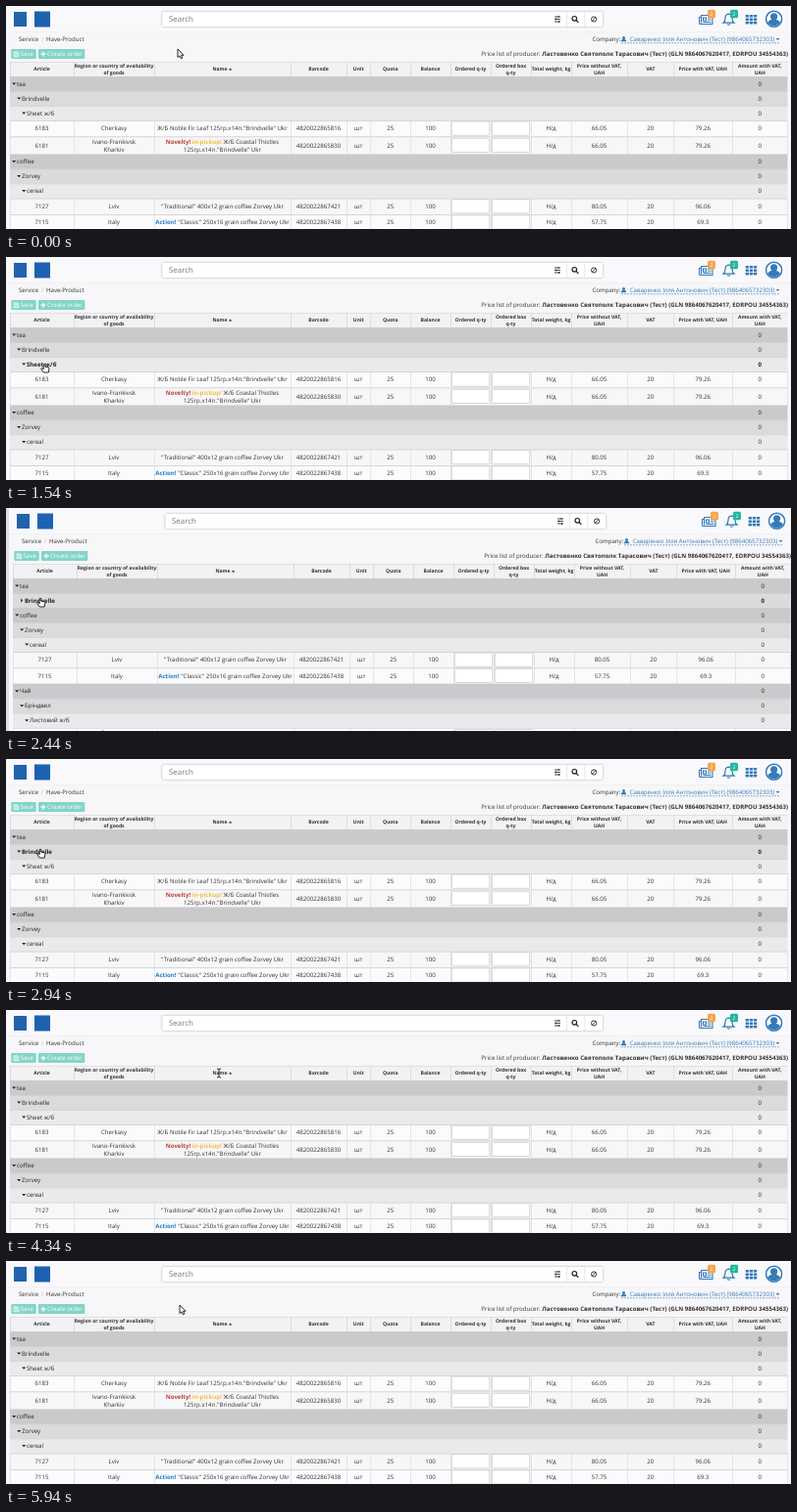
These frames come from a looping animation (800x228 px, 6240 ms). An HTML page:

```html
<!DOCTYPE html>
<html lang="en">
<head>
<meta charset="utf-8">
<title>Price list</title>
<style>
html, body { margin: 0; width: 100%; height: 100%; overflow: hidden; background: #f7f6f8; }
svg { display: block; width: 800px; height: 228px; font-family: "Open Sans", "Noto Sans", sans-serif; text-rendering: geometricPrecision; }
.raised { filter: drop-shadow(0 .3px 1.3px #aaa); }
</style>
</head>
<body>
<svg viewBox="0 0 800 228">
  <g id="page"><g id="chrome"></g><g id="rows"></g></g>
  <g id="cursor" stroke="#111" stroke-width=".9" stroke-linejoin="round" fill="#fff">
    <path id="arrow" d="M0 0V8.6L2 6.9 3.3 9.8 4.8 9.1 3.5 6.3H6Z"/>
    <path id="hand" d="M-.8 .6Q0-.4.8.6V3.2L4 3.7Q5 4 4.8 5.3L4.2 9H-.8L-3.4 5.3Q-3.2 4.2-2 4.8L-.8 5.8Z"/>
    <path id="beam" fill="none" d="M-2-4.5Q0-4.5 0-3.5Q0-4.5 2-4.5M0-3.5V3.5M-2 4.5Q0 4.5 0 3.5Q0 4.5 2 4.5"/>
  </g>
</svg>
<script>
const LOOP = 6240, TOP = 72.2, BODY = 6.1, BLUE = '#337ab7';
const $ = id => document.getElementById(id);

const rect = (x, y, w, h, fill, extra = '') =>
  `<rect x="${x}" y="${y}" width="${w}" height="${h}" fill="${fill}" ${extra}/>`;
const path = (d, fill, extra = '') => `<path d="${d}" fill="${fill}" ${extra}/>`;
// y is the vertical middle of the digits
const text = (x, y, str, { size = BODY, anchor = 'start', bold = false, fill = '#333' } = {}) =>
  `<text x="${x}" y="${y + size * .36}" font-size="${size}" text-anchor="${anchor}" ` +
  `font-weight="${bold ? 700 : 400}" fill="${fill}">${str}</text>`;
const lines = (x, y, list, gap, opts) =>
  list.map((s, i) => text(x, y + (i - (list.length - 1) / 2) * gap, s, { anchor: 'middle', ...opts })).join('');
const strong = (str, fill) => `<tspan font-weight="700" fill="${fill}">${str}</tspan>`;

const edges = [4, 69, 151, 290, 347, 371.5, 412, 453, 494, 535, 576, 633, 680.5, 740, 796.5];
const mid = i => (edges[i] + edges[i + 1]) / 2;
const headers = [
  ['Article'], ['Region or country of availability', 'of goods'], ['Name'], ['Barcode'], ['Unit'], ['Quota'],
  ['Balance'], ['Ordered q-ty'], ['Ordered box', 'q-ty'], ['Total weight, kg'], ['Price without VAT,', 'UAH'],
  ['VAT'], ['Price with VAT, UAH'], ['Amount with VAT,', 'UAH']
];

const group = (level, name) => ({ level, name, height: 15 });
const item = (article, region, name, barcode, price, gross) =>
  ({ level: 3, article, region, name, barcode, price, gross, height: Math.max(region.length, name.length) > 1 ? 18.2 : 16.3 });
const tree = [
  group(0, 'tea'), group(1, 'Brindvelle'), group(2, 'Sheet ж/б'),
  item('6183', ['Cherkasy'], ['Ж/Б Noble Fir Leaf 125гр.х14п."Brindvelle" Ukr'], '4820022865816', '66.05', '79.26'),
  item('6181', ['Ivano-Frankivsk', 'Kharkiv'],
    [strong('Novelty!', '#bb4238') + ' ' + strong('in-pickup!', '#f0c440') + ' Ж/Б Coastal Thistles', '125гр.х14п."Brindvelle" Ukr'],
    '4820022865830', '66.05', '79.26'),
  group(0, 'coffee'), group(1, 'Zorvey'), group(2, 'cereal'),
  item('7127', ['Lviv'], ['"Traditional" 400x12 grain coffee Zorvey Ukr'], '4820022867421', '80.05', '96.06'),
  item('7115', ['Italy'], [strong('Action!', '#2a7fc4') + ' "Classic" 250x16 grain coffee Zorvey Ukr'], '4820022867438', '57.75', '69.3'),
  group(0, 'Чай'), group(1, 'Бріндвел'), group(2, 'Листовий ж/б'),
  item('6183', ['Волинська', 'Харківська'], ['Ж/Б Noble Fir Leaf 125гр.х14п."Бріндвел" Укр'], '4820022865816', '66.05', '79.26')
];

function drawChrome() {
  const badge = (x, n, fill) => rect(x - 4, 3.8, 8, 8.4, fill, 'rx="1.5"') +
    text(x, 8, n, { size: 5, anchor: 'middle', fill: '#fff' });
  let s = rect(-4, 0, 4, 228, '#e0dfe1') + rect(0, 0, 800, 26.5, '#f9f8fb') + rect(0, 26.5, 800, .6, '#ececee');
  s += rect(8, 6, 13, 15, '#2163ad') + rect(29, 5.5, 16, 16, '#1d62b0');

  s += rect(159.4, 6, 448.6, 15, '#fff', 'rx="1" class="raised"');
  s += text(166, 13.3, 'Search', { size: 7.9, fill: '#777' });
  s += rect(571, 6, .7, 15, '#ddd') + rect(589.5, 6, .7, 15, '#ddd');
  s += path('M559 11h6M559 13.5h6M559 16h6M563 10v2M560.5 12.5v2M563.5 15v2', 'none', 'stroke="#333" stroke-width=".9"');
  s += path('M581.6 12.8a2.3 2.3 0 1 0-4.6 0a2.3 2.3 0 1 0 4.6 0M581 14.5l2.4 2.4', 'none', 'stroke="#222" stroke-width="1.2"');
  s += path('M601.7 13.5a2.6 2.6 0 1 0-5.2 0a2.6 2.6 0 1 0 5.2 0M597.3 15.3l3.6-3.6', 'none', 'stroke="#222" stroke-width=".9"');

  s += path('M708.5 9.5h11.5v9h-12.5q-1 0-1-1v-6h2zM708.5 11.5v6M710.5 12h3v3h-3zM715 12h3.5M715 14.3h3.5M710.5 16.5h8', 'none', `stroke="${BLUE}" stroke-width="1.1"`);
  s += badge(719, '2', '#f5a54f');
  s += path('M731 17.2q2-1.5 2-5q0-3.5 3.5-4q3.5.5 3.5 4q0 3.5 2 5zM735 18.6q1.5 1.3 3 0', 'none', `stroke="${BLUE}" stroke-width="1.2"`);
  s += badge(742, '2', '#1fb99c');
  for (let i = 0; i < 9; i++) s += rect(753.7 + i % 3 * 4.1, 9 + Math.floor(i / 3) * 3.4, 3.3, 2.6, BLUE, 'rx=".4"');
  s += `<circle cx="782.6" cy="13.3" r="8" fill="#fff" stroke="${BLUE}" stroke-width="1.5"/>` +
    `<circle cx="782.6" cy="10.8" r="3.6" fill="${BLUE}"/>` + path('M776.2 17.6q.8-3.6 4.4-3.6h4q3.6 0 4.4 3.6q-6.4 5.4-12.8 0', BLUE);

  s += text(13, 34, 'Service') + text(36, 34, '/', { fill: '#bbb' }) + text(41, 34, 'Have-Product');
  s += text(597.5, 34, 'Company:');
  s += `<circle cx="629.5" cy="32.4" r="1.5" fill="${BLUE}"/>` + path('M626.8 36.3q0-2.5 2.7-2.5q2.7 0 2.7 2.5z', BLUE);
  s += text(783.3, 34, 'Саваренко Ілля Антонович (Тест) (9864065732303)', { fill: BLUE, anchor: 'end' });
  s += path('M627 37.8H788', 'none', `stroke="${BLUE}" stroke-width=".6" stroke-dasharray="2 1"`);
  s += path('M784.5 33h4l-2 2z', BLUE);

  s += rect(5.3, 44, 25.4, 10, '#82d5c7', 'rx="1"') + rect(33, 44, 47.3, 10, '#82d5c7', 'rx="1"');
  s += path('M8 46.8h4l1 1v4h-5zM9.2 47v1.6h2.4V47M9.2 51.5v-1.6h2.6v1.6', 'none', 'stroke="#fff" stroke-width=".7"');
  s += text(14.7, 49, 'Save', { fill: '#fff' });
  s += path('M35.5 49.2h5M38 46.7v5', 'none', 'stroke="#fff" stroke-width="1.3"');
  s += text(42, 49, 'Create order', { fill: '#fff' });
  s += text(797, 48.7, 'Price list of producer: ' +
    strong('Ластовенко Святополк Тарасович (Тест) (GLN 9864067620417, EDRPOU 34554363)', '#333'), { anchor: 'end' });

  s += rect(4, 57, 792.5, 15.2, '#f2f1f3') + rect(4, 57, 792.5, .6, '#d5d5d5');
  headers.forEach((h, i) => {
    s += rect(edges[i], 57, .6, 15.2, '#d0d0d0');
    s += lines(mid(i) - (i === 2 ? 2.5 : 0), 64.6, h, 7, { size: 5.05, bold: true });
  });
  s += path('M226.8 65.5h3.6l-1.8-2z', '#333');
  $('chrome').innerHTML = s;
}

function layout(closed) {
  const visible = [];
  let y = TOP, hiddenBelow = 9;
  tree.forEach((row, index) => {
    if (row.level > hiddenBelow) return;
    hiddenBelow = index === closed ? row.level : 9;
    visible.push({ ...row, index, y });
    y += row.height;
  });
  return visible;
}

function drawGroup(row, hovered, closed) {
  const { level, y, name } = row, c = y + 7.4, x = 6.2 + level * 5;
  const opts = { bold: hovered, fill: '#222' };
  const marker = closed ? `M${x + 1} ${c - 2}v4l2-2z` : `M${x} ${c - 1}h4l-2 2.2z`;
  return rect(4, y, 792.5, 15.1, ['#cac9cb', '#dcdadd', '#ebe9ec'][level]) +
    rect(4, y, 792.5, .5, '#c4c3c5') + path(marker, '#222') +
    text(x + 4.8, c, name, opts) + text(mid(13), c, '0', { ...opts, anchor: 'middle' });
}

function drawItem(row) {
  const { y, height } = row, c = y + height / 2 - .2;
  const cells = [[row.article], row.region, row.name, [row.barcode], ['шт'], ['25'], ['100'], [], [], ['Н/д'],
    [row.price], ['20'], [row.gross], ['0']];
  let s = rect(4, y, 792.5, height, row.index % 2 ? '#fbfafc' : '#f7f6f8') + rect(4, y, 792.5, .7, '#c8c7c9');
  cells.forEach((cell, i) => {
    s += rect(edges[i], y, .6, height, '#d8d7d9') + lines(mid(i), c, cell, 8);
  });
  for (const i of [7, 8])
    s += rect(edges[i] + 1.2, c - 7.1, 38.5, 14.2, '#fff', 'rx="1" stroke="#c4c4c4" stroke-width=".7"');
  return s + rect(796, y, .6, height, '#d8d7d9');
}

// [start, end, index of the folded group]
const folds = [[1560, 2060, 2], [2440, 2820, 1], [3400, 3800, 0]];
// [time, x, y] of the pointer tip
const stops = [[0, 175, 44], [420, 175, 44], [1020, 16, 102], [1280, 39, 109], [2200, 39.5, 109], [2420, 35, 92],
  [3000, 35, 92], [3300, 17, 80.5], [3850, 17, 80.5], [4300, 217, 64.5], [5160, 218, 67], [5700, 177, 45], [LOOP, 177, 45]];

function pointerAt(t) {
  const i = stops.findIndex(s => s[0] > t);
  const [t0, x0, y0] = stops[i - 1], [t1, x1, y1] = stops[i];
  const u = (t - t0) / (t1 - t0), e = u * u * (3 - 2 * u);
  return [x0 + (x1 - x0) * e, y0 + (y1 - y0) * e];
}

let drawn = '';
function render(t) {
  const fold = folds.find(([a, b]) => t >= a && t < b);
  const closed = fold ? fold[2] : -1;
  const [x, y] = pointerAt(t);
  const visible = layout(closed);
  const over = visible.find(r => r.level < 3 && y >= r.y && y < r.y + r.height);
  const hovered = over ? over.index : -1;

  const key = closed + '/' + hovered;
  if (key !== drawn) {
    drawn = key;
    $('page').setAttribute('transform', `translate(${fold ? 3 : 0})`);
    $('rows').innerHTML = visible.map(r =>
      r.level < 3 ? drawGroup(r, r.index === hovered, r.index === closed) : drawItem(r)).join('');
  }
  const onTitle = y > 59 && y < 72 && x > 208 && x < 229;
  const shape = over ? 'hand' : onTitle ? 'beam' : 'arrow';
  for (const id of ['arrow', 'hand', 'beam']) $(id).style.display = id === shape ? '' : 'none';
  $('cursor').setAttribute('transform', `translate(${x} ${y})`);
}

drawChrome();
const start = performance.now();
function tick() {
  render((performance.now() - start) % LOOP);
  requestAnimationFrame(tick);
}
tick();
</script>
</body>
</html>
```
